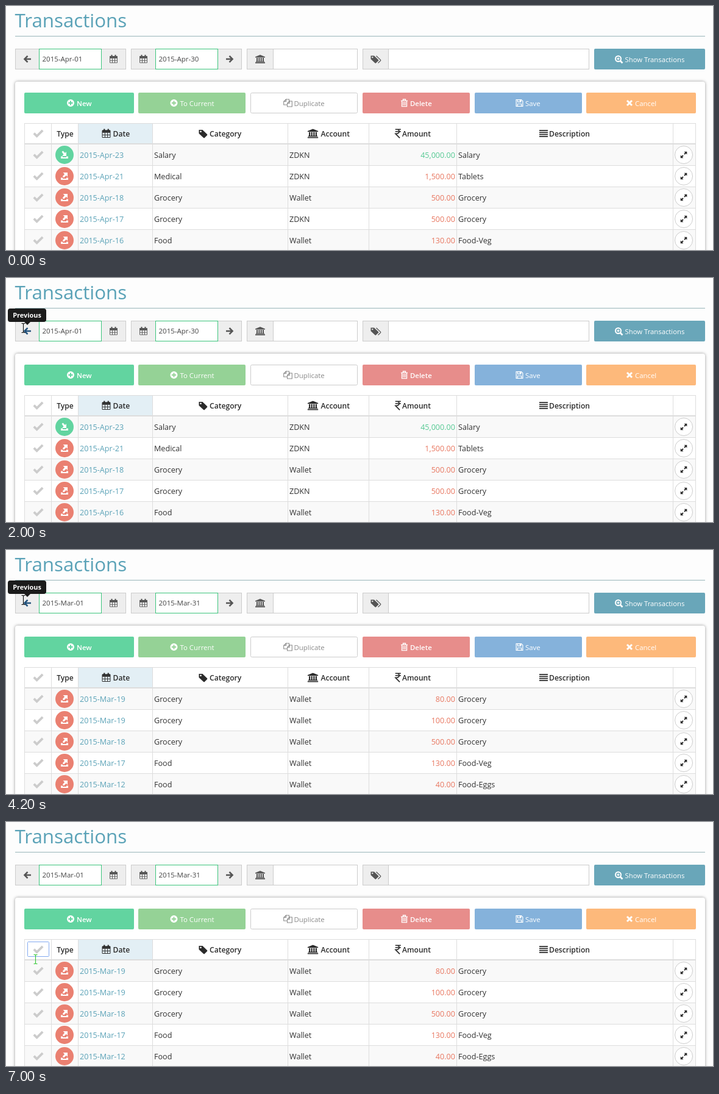
Write an HTML page that moves like this. It is 1160 px wide and 400 px high and loops after 8 s.

```html
<!DOCTYPE html>
<html lang="en">
<head>
<meta charset="utf-8">
<title>Transactions</title>
<style>
html, body { margin: 0; width: 100%; height: 100%; overflow: hidden; background: #fdfdfd; }
svg { display: block; width: 1160px; height: 400px; font-family: "Open Sans", "Noto Sans", sans-serif; }
.panel { filter: drop-shadow(0 0 2.5px rgba(0, 0, 0, .4)); }
</style>
</head>
<body>
<svg id="stage" viewBox="0 0 1160 400"></svg>
<script>
const LOOP = 8000;
const GREEN = '#62d4a0', RED = '#ea8071', TEAL = '#5aa2b7', DARK = '#2b2b2b', GRAY = '#555';

const rect = (x, y, w, h, fill, extra = '') =>
  `<rect x="${x}" y="${y}" width="${w}" height="${h}" fill="${fill}" ${extra}/>`;
const box = (x, y, w, h, fill, stroke, rx = 0) =>
  rect(x + .5, y + .5, w - 1, h - 1, fill, `stroke="${stroke}" rx="${rx}"`);
const text = (x, y, str, size, fill, weight = 400, anchor = 'start') =>
  `<text x="${x}" y="${y}" font-size="${size}" fill="${fill}" font-weight="${weight}" text-anchor="${anchor}">${str}</text>`;
const line = (d, width = 1.2) => `<path d="${d}" fill="none" stroke="currentColor" stroke-width="${width}"/>`;
const solid = d => `<path d="${d}" fill="currentColor" fill-rule="evenodd"/>`;

const TAG = 'M-6.5 -5.5 H-1 L6 1.2 Q6.8 2 6 2.8 L2 6.6 Q1.2 7.2 .5 6.5 L-6.5 0 Z M-4.9 -2.9 a1.2 1.2 0 1 0 2.4 0 a1.2 1.2 0 1 0 -2.4 0';
const TRANSFER = solid('M-6 2.5 H-3 V4 H3 V2.5 H6 V6 H-6 Z');

// Every icon is drawn around its own centre.
const ICONS = {
  left: line('M.5 -5.2 L-4.6 0 L.5 5.2 M-4 0 H6', 2.5),
  right: line('M-.5 -5.2 L4.6 0 L-.5 5.2 M4 0 H-6', 2.5),
  calendar: line('M-6 -4.5 H6 V6 H-6 Z M-6 -1.5 H6 M-6 2.2 H6 M-2 -1.5 V6 M2 -1.5 V6', .9) +
    solid('M-6 -5 H6 V-2 H-6 Z') + line('M-3 -7 V-3 M3 -7 V-3', 2),
  bank: solid('M0 -7 L8 -3.8 V-2.5 H-8 V-3.8 Z M-7 3.5 H7 V4.7 H-7 Z M-8 5.3 H8 V7 H-8 Z') +
    line('M-5 -2 V4 M-1.7 -2 V4 M1.7 -2 V4 M5 -2 V4', 2),
  tag: solid(TAG),
  tags: `<g transform="translate(-1.5 0)">${solid(TAG)}</g>` + line('M1 -5.2 L8 1.4 Q8.5 2 8 2.6 L4 6.5', 1.3),
  zoom: '<circle cx="-1" cy="-1" r="4.5" fill="none" stroke="currentColor" stroke-width="2"/>' +
    line('M2.5 2.5 L6 6', 2.6) + line('M-3.3 -1 H1.3 M-1 -3.3 V1.3', 1.3),
  plus: solid('M-6 0 a6 6 0 1 0 12 0 a6 6 0 1 0 -12 0 M-1 -3.6 H1 V-1 H3.6 V1 H1 V3.6 H-1 V1 H-3.6 V-1 H-1 Z'),
  copy: line('M-3 -6 H2 V-2.5 M-1 3 H-6.8 V-2.5 L-3 -6 V-2.5 H-6.8 M2.6 -3 H6.8 V6 H-1 V.5 L2.6 -3 V.5 H-1', 1.1),
  trash: line('M-4 -3 V5.6 H4 V-3 M-5.5 -3.6 H5.5 M-2 -4 V-6 H2 V-4', 1.4) +
    line('M-1.9 -2 V4 M0 -2 V4 M1.9 -2 V4', 1),
  save: line('M-5.4 -5.4 H3 L5.4 -3 V5.4 H-5.4 Z M-3 -5.4 V-1.6 H2.3 V-5.4 M-3.2 5.4 V1.5 H3.2 V5.4', 1.2) +
    solid('M.2 -5 H2 V-2.4 H.2 Z'),
  cross: line('M-4 -4 L4 4 M4 -4 L-4 4', 3),
  rupee: line('M-4 -6.3 H4.5 M-4 -3 H4.5 M-4 -6.3 H-1.5 Q2 -6 2 -3 Q2 .3 -3.6 .4 L2.8 6.8', 1.5),
  lines: line('M-6.5 -4.5 H6.5 M-6.5 -1.5 H6.5 M-6.5 1.5 H6.5 M-6.5 4.5 H6.5', 1.8),
  check: line('M-7.2 -.4 L-2.4 4.4 L7.2 -5.2', 3.8),
  income: TRANSFER + solid('M-4.5 -5 L-2.5 -6.5 L1 -3 L3 -5 V2 H-4 L-1.5 -.5 Z'),
  expense: TRANSFER + solid('M-2.5 -6 H5 V1 L2.8 -1.2 L-1.2 2.4 L-3.2 .4 L.2 -3.4 Z'),
  expand: line('M-3.8 3.8 L-1 1 M3.8 -3.8 L1 -1', 2) +
    solid('M-5.3 .6 V5.3 H-.6 Z M.6 -5.3 H5.3 V-.6 Z')
};
const icon = (name, x, y, color, scale = 1) =>
  `<g transform="translate(${x} ${y}) scale(${scale})" color="${color}">${ICONS[name]}</g>`;

const MONTHS = {
  Apr: {
    last: 30,
    rows: [
      [23, 'Salary', 'ZDKN', '45,000.00', 'Salary'],
      [21, 'Medical', 'ZDKN', '1,500.00', 'Tablets'],
      [18, 'Grocery', 'Wallet', '500.00', 'Grocery'],
      [17, 'Grocery', 'ZDKN', '500.00', 'Grocery'],
      [16, 'Food', 'Wallet', '130.00', 'Food-Veg']
    ]
  },
  Mar: {
    last: 31,
    rows: [
      [19, 'Grocery', 'Wallet', '80.00', 'Grocery'],
      [19, 'Grocery', 'Wallet', '100.00', 'Grocery'],
      [18, 'Grocery', 'Wallet', '500.00', 'Grocery'],
      [17, 'Food', 'Wallet', '130.00', 'Food-Veg'],
      [12, 'Food', 'Wallet', '40.00', 'Food-Eggs']
    ]
  }
};

function addon(x, w, name, color = GRAY) {
  return box(x, 70, w, 34, '#eee', '#ccc') + icon(name, x + w / 2, 87, color);
}

function filters(month, arrowColor) {
  const field = (x, w, str) => box(x, 70, w, 34, '#fff', str ? '#3cc47c' : '#ccc') +
    text(x + 5.5, 91, str, 11.5, '#444');
  return addon(15, 40, 'left', arrowColor) + addon(156, 41, 'calendar') + field(54, 103, `2015-${month}-01`) +
    addon(205, 41, 'calendar') + addon(347, 40, 'right') + field(245, 103, `2015-${month}-${MONTHS[month].last}`) +
    addon(395, 44, 'bank') + field(438, 139, '') +
    addon(585, 43, 'tags') + field(627, 330, '') +
    rect(965, 70, 182, 34, '#69a6b9', 'rx="2"') + icon('zoom', 1005.5, 87.5, '#fff') +
    text(1015.5, 91.5, 'Show Transactions', 11.3, '#fff', 500);
}

function button(x, w, fill, name, iconX, label, labelX, color = '#fff', weight = 500) {
  const shape = fill === '#fff' ? box(x, 142, w, 34, fill, '#ccc', 2) : rect(x, 142, w, 34, fill, 'rx="2"');
  return shape + icon(name, iconX, 159, color) + text(labelX, 163.5, label, 11.4, color, weight);
}

function badge(x, fill, color, weight) {
  return rect(x, 152, 29, 16, fill, 'rx="8"') + text(x + 14.5, 164, '10', 11.4, color, weight, 'middle');
}

function toolbar(checked) {
  const shift = checked ? -16 : 0;
  return button(30, 180, GREEN, 'plus', 106, 'New', 116, '#fff', 600) +
    button(217, 176, checked ? GREEN : '#95d296', 'plus', 275.5 + shift, 'To Current', 285.5 + shift) +
    button(401, 176, '#fff', 'copy', 462.5 + shift, 'Duplicate', 472.5 + shift, checked ? '#333' : '#8a8a8a', 400) +
    button(585, 176, checked ? RED : '#e78d8b', 'trash', 653.5 + shift, 'Delete', 663 + shift, '#fff', 600) +
    button(769, 176, '#85b2db', 'save', 842.5, 'Save', 852) +
    button(952, 180, '#fdb97b', 'cross', 1023, 'Cancel', 1032) +
    (checked ? badge(329, '#fff', '#80855a', 400) + badge(511, DARK, '#fff', 600) + badge(685, '#fff', '#c08050', 400) : '');
}

function tableHead(checkColor) {
  const head = (name, iconX, label, x) => icon(name, iconX, 209, DARK, 1.08) + text(x, 214, label, 12.1, DARK, 600);
  return rect(118, 192, 122, 34, '#e3eff5') + icon('check', 53, 209, checkColor) +
    text(97, 214, 'Type', 12.1, DARK, 600, 'middle') +
    head('calendar', 164.5, 'Date', 175.5) + head('tag', 323.5, 'Category', 334) +
    head('bank', 503.5, 'Account', 516.5) + head('rupee', 643, 'Amount', 650) +
    head('lines', 882, 'Description', 891);
}

function tableRow([day, category, account, amount, note], i, month, checkColor) {
  const y = 244 + 35 * i, income = category === 'Salary';
  const cell = (x, str, color = '#333', anchor) => text(x, y + 5, str, 12.6, color, 400, anchor);
  return (i % 2 ? '' : rect(30, y - 17, 1102, 34, '#f9f9f9')) +
    icon('check', 53, y, checkColor) +
    `<circle cx="96" cy="${y}" r="15" fill="${income ? GREEN : RED}"/>` +
    icon(income ? 'income' : 'expense', 96, y, '#fff') +
    cell(121, `2015-${month}-${day}`, TEAL) + cell(243, category) + cell(465, account) +
    cell(737, amount, income ? '#55c993' : '#e8765f', 'end') + cell(742, note) +
    `<circle cx="1112" cy="${y}" r="14.5" fill="#fff" stroke="#ccc"/>` + icon('expand', 1112, y, DARK);
}

function grid() {
  const columns = [30, 74, 118, 240, 462, 595, 739, 1094, 1131];
  const lines = [192, 261, 296, 331, 366];
  return columns.map(x => rect(x, 192, 1, 208, '#ddd')).join('') +
    lines.map(y => rect(30, y, 1102, 1, '#ddd')).join('') + rect(30, 225, 1102, 2, '#ddd');
}

const tooltip = () => rect(3, 50, 63, 22, '#1b1b1b', 'rx="4"') +
  '<path d="M30 72 H40 L35 77 Z" fill="#1b1b1b"/>' + text(34.5, 65, 'Previous', 10.9, '#fff', 700, 'middle');

const cursor = ([x, y, color = '#111']) =>
  `<path transform="translate(${x} ${y})" d="M-3 .5 H-1 L0 1.5 L1 .5 H3 M0 1.5 V14.5 M-3 15.5 H-1 L0 14.5 L1 15.5 H3" fill="none" stroke="${color}" stroke-width="1.1"/>`;

function sceneAt(t) {
  const pointer = t < 1000 ? null : t < 2000 ? [32.5, 81] : t < 5000 ? [28.5, 74] :
    t < 7000 ? [46.5, 196] : [48.5, 217, '#35c835'];
  return {
    month: t < 3000 ? 'Apr' : 'Mar',
    arrow: t >= 1000 && t < 6000 ? '#23527c' : GRAY,
    tip: t >= 2000 && t < 5000,
    checked: t >= 6000 && t < 7000,
    focus: t >= 6000,
    pointer
  };
}

function draw({ month, arrow, tip, checked, focus, pointer }) {
  const checkColor = checked ? '#222' : '#ccc';
  return rect(0, 0, 1160, 400, '#fdfdfd') +
    text(14.5, 35, 'Transactions', 31.3, TEAL) + rect(15, 49, 1132, 1, '#97b5b8') +
    filters(month, arrow) +
    rect(15, 124, 1132, 290, '#fff', 'rx="4" class="panel"') +
    toolbar(checked) + tableHead(checkColor) +
    MONTHS[month].rows.map((row, i) => tableRow(row, i, month, checkColor)).join('') + grid() +
    (focus ? box(35, 196, 36, 25, 'none', '#83aaf0', 1) : '') +
    (tip ? tooltip() : '') + (pointer ? cursor(pointer) : '');
}

const stage = document.getElementById('stage');
const start = performance.now();
let shown = '';

function update(now) {
  const scene = sceneAt(Math.max(0, now - start) % LOOP);
  const key = JSON.stringify(scene);
  if (key !== shown) {
    stage.innerHTML = draw(scene);
    shown = key;
  }
  requestAnimationFrame(update);
}
update(start);
</script>
</body>
</html>
```
